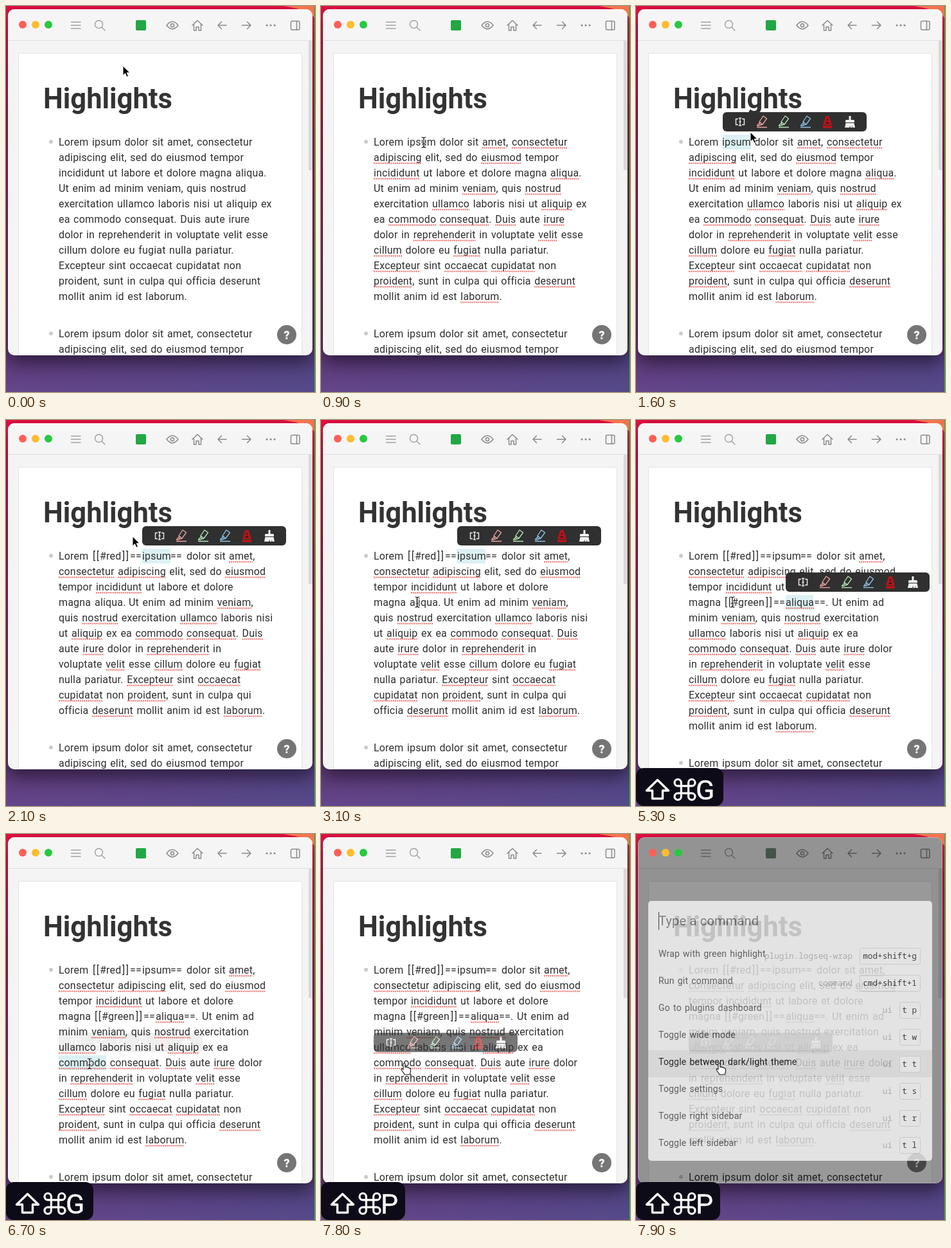
Recreate the animation shown at these times as an HTML page. Size 481x600 px, loop 8000 ms.

```html
<!DOCTYPE html>
<html lang="en">
<head>
<meta charset="utf-8">
<title>Highlights</title>
<style>
  html, body { margin: 0; width: 100%; height: 100%; overflow: hidden; background: #5b4088; }
  svg { display: block; }
  text { font-family: Roboto, "Noto Sans", sans-serif; }
  .body { font-size: 16px; letter-spacing: .18px; word-spacing: 1.4px; fill: #2e2e2e; }
  .bracket { letter-spacing: 1.5px; }
  .wave { stroke: #e8706b; stroke-width: 2; stroke-dasharray: 2 1; }
  .icon { fill: none; stroke: #8a8a8a; stroke-width: 1.5; stroke-linecap: round; stroke-linejoin: round; }
  .label { font-size: 14px; letter-spacing: .2px; word-spacing: 1.4px; fill: #4a4a4a; }
  .mono { font-family: "Noto Sans Mono", "DejaVu Sans Mono", monospace; font-size: 12.7px; }
</style>
</head>
<body>
<svg id="stage" width="481" height="600" viewBox="0 0 481 600">
  <defs>
    <linearGradient id="wall" x2="0" y2="1">
      <stop offset="0" stop-color="#e80f42"/><stop offset=".3" stop-color="#a5174e"/>
      <stop offset=".85" stop-color="#5f3272"/><stop offset="1" stop-color="#64468a"/>
    </linearGradient>
    <linearGradient id="cool">
      <stop offset="0" stop-color="#3f4f8c" stop-opacity="0"/><stop offset="1" stop-color="#3f4f8c" stop-opacity=".4"/>
    </linearGradient>
    <clipPath id="frame"><rect x="3" y="5" width="474" height="538" rx="10"/></clipPath>
  </defs>

  <rect width="481" height="600" fill="url(#wall)"/>
  <rect y="543" width="481" height="57" fill="url(#cool)"/>
  <rect x="3" y="5" width="474" height="538" rx="10" style="filter:drop-shadow(0 12px 14px rgba(0,0,0,.5))"/>
  <path d="M432 0H481V20Q474 6 432 0Z" fill="#f4744f"/>

  <g clip-path="url(#frame)">
    <g id="content">
      <rect x="3" y="5" width="474" height="538" fill="#f4f4f4"/>
      <rect x="3" y="5" width="474" height="48" fill="#f6f5f6"/>
      <path d="M3 53.5H477" stroke="#e0e0e0"/>
      <rect x="471" y="54" width="6" height="201" fill="#d9d9d9"/>
      <rect x="19.5" y="73.5" width="441" height="480" fill="#fff" stroke="#e4e4e4"/>

      <g class="icon">
        <path d="M101.5 25H116M101.5 30H116M101.5 35H116" stroke="#a2a2a2"/>
        <path d="M149 33L154 38M150.5 28.5a6 6 0 1 1-12 0a6 6 0 1 1 12 0" stroke="#a2a2a2"/>
        <path d="M250 30Q259 18.5 268 30Q259 41.5 250 30Z"/><circle cx="259" cy="30" r="2.6"/>
        <path d="M290 30L298 22.5L306 30M292.5 28.5V38H296V32.5H300V38H303.5V28.5"/>
        <path d="M343 30H330M335.5 24.5L330 30L335.5 35.5"/>
        <path d="M367.5 30H381M375.5 24.5L381 30L375.5 35.5"/>
        <path d="M406 30h.1M412 30h.1M418 30h.1" stroke-width="3"/>
        <rect x="443.5" y="23.5" width="13.5" height="13.5" rx="2"/><path d="M452.5 24V37"/>
      </g>
      <rect x="202" y="22" width="16" height="16" rx="2" fill="#22a743"/>

      <text x="58" y="158.5" font-size="43.5" font-weight="700" fill="#333">Highlights</text>
      <g id="marks" fill="#dcf1f4"></g>
      <g id="notes"></g>

      <g id="bar">
        <rect width="224" height="30" rx="6" fill="#303030"/>
        <path d="M24 10.500H20.500V19.500H24M30 10.500H33.500V19.500H30M25 9Q27 9 27 10.500V19.500Q27 21 25 21M29 9Q27 9 27 10.500M27 19.500Q27 21 29 21M25.500 15H28.500"
              fill="none" stroke="#eee" stroke-width="1.400"/>
        <g id="pens" fill="none" stroke-width="1.3" stroke-linejoin="round"></g>
        <g fill="#b51519">
          <path d="M160.5 6H165.5L170 20H156Z"/><rect x="156" y="21" width="14" height="4"/>
          <path d="M163 9L164.5 13H161.5ZM161 15.5H165L165.8 18H160.2Z" fill="#421717"/>
        </g>
        <path d="M196.5 6H199.5V12H203.5Q205 12 205 13.5V16H191V13.5Q191 12 192.5 12H196.5ZM191.5 17H204.5L206 24H202.5L201.5 20.5V24H198.5V20.5L197 24H190Z" fill="#f2f2f2"/>
      </g>

      <circle cx="437" cy="511" r="15" fill="#757575"/>
      <text x="437" y="517.5" font-size="18" font-weight="900" fill="#fff" text-anchor="middle">?</text>
    </g>

    <g id="lights">
      <circle cx="26" cy="29" r="6" fill="#fe5f57"/>
      <circle cx="46" cy="29" r="6" fill="#febc2e"/>
      <circle cx="66" cy="29" r="6" fill="#28c840"/>
    </g>

    <g id="palette" opacity=".73">
      <rect x="19" y="104" width="442" height="404" rx="5" fill="#fff"/>
      <rect x="19" y="336" width="442" height="42" fill="#efefef"/>
      <path d="M35.5 121V149" stroke="#222"/>
      <text x="35" y="142" font-size="20" fill="#777" letter-spacing=".2">Type a command</text>
    </g>
  </g>
  <rect x="3.5" y="5.5" width="473" height="537" rx="9.5" fill="none" stroke="#fff" stroke-opacity=".25"/>

  <g id="keys">
    <rect id="keyBox" x="0" y="541" height="59" rx="12" fill="#0e0b18"/>
    <g fill="none" stroke="#fff" stroke-width="3.4" stroke-linejoin="round">
      <path d="M33.5 559.5L50.500 576H41.500V588.500H25.500V576H16.500Z"/>
      <path transform="translate(76 574.5) scale(.94)" d="M-6-6V-11.5a5.5 5.5 0 1 0-5.5 5.5H11.5a5.5 5.5 0 1 0-5.5-5.5V11.5a5.5 5.5 0 1 0 5.5-5.5H-11.5a5.5 5.5 0 1 0 5.5 5.5Z"/>
    </g>
    <text id="keyChar" x="93" y="589.5" font-size="43" fill="#fff" stroke="#fff" stroke-width=".4"></text>
  </g>

  <g id="cursor">
    <path id="arrow" d="M0 0V15L3.5 11.7L6 17.2L8.5 16L6.2 10.8H11Z" fill="#000" stroke="#fff"/>
    <g id="beam" fill="none" stroke-linecap="round">
      <path d="M-3-8Q0-8 0-6V6Q0 8-3 8M3-8Q0-8 0-6M0 6Q0 8 3 8M-2 2H2" stroke="#fff" stroke-width="2.6"/>
      <path d="M-3-8Q0-8 0-6V6Q0 8-3 8M3-8Q0-8 0-6M0 6Q0 8 3 8M-2 2H2" stroke="#111" stroke-width="1.2"/>
    </g>
    <path id="hand" d="M-2 9V1Q-2-1-.5-1Q1-1 1 1V5.5Q3.5 4 4 6Q6.5 5 7 7Q9.5 6.5 9.5 9V12Q9.5 14 8 17H0Q-1 14.5-4 11Q-5.5 8.5-4 8Q-3 7.5-2 9Z"
          fill="#fff" stroke="#111" stroke-width="1.1" stroke-linejoin="round"/>
  </g>
  <rect x="480" width="1" height="600" fill="#12c01a"/>
</svg>
<script>
const LOOP = 8000, STEP = 100, LEFT = 82, PITCH = 24;
const $ = id => document.getElementById(id);

function add(parent, tag, attrs, content) {
  const el = document.createElementNS("http://www.w3.org/2000/svg", tag);
  for (const k in attrs) el.setAttribute(k, attrs[k]);
  if (content) el.textContent = content;
  parent.appendChild(el);
  return el;
}

const odd = new Set(("amet consectetur adipiscing eiusmod incididunt aliqua veniam nostrud ullamco aliquip " +
  "commodo consequat Duis irure reprehenderit velit cillum fugiat Excepteur occaecat cupidatat " +
  "proident deserunt laborum").split(" "));

// "@123" places what follows at x = 123.
const plain = `Lorem ipsum dolor sit amet, consectetur
adipiscing elit, sed do eiusmod tempor
incididunt ut labore et dolore magna aliqua.
Ut enim ad minim veniam, quis nostrud
exercitation ullamco laboris nisi ut aliquip ex
ea commodo consequat. Duis aute irure
dolor in reprehenderit in voluptate velit esse
cillum dolore eu fugiat nulla pariatur.
Excepteur sint occaecat cupidatat non
proident, sunt in culpa qui officia deserunt
mollit anim id est laborum.`;

const red = `Lorem @135[[@146#red@181]]@193==@212ipsum@256== @281dolor sit @347amet,
consectetur adipiscing elit, sed do eiusmod
tempor incididunt ut labore et dolore
magna @138aliqua. @191Ut enim ad minim veniam,
quis nostrud exercitation ullamco laboris nisi
ut aliquip ex ea commodo consequat. Duis
aute irure dolor in reprehenderit in
voluptate velit esse cillum dolore eu fugiat
nulla pariatur. Excepteur sint occaecat
cupidatat non proident, sunt in culpa qui
officia deserunt mollit anim id est laborum.`;

const green = [...red.split("\n").slice(0, 3),
  "magna @138[[@149#green@202]]@214==@233aliqua@277==. @305Ut enim ad",
  "minim veniam, quis nostrud exercitation",
  "ullamco laboris nisi ut aliquip ex ea",
  "commodo consequat. Duis aute irure dolor",
  "in reprehenderit in voluptate velit esse",
  ...plain.split("\n").slice(7)].join("\n");

function drawLine(group, waves, line, y, skip) {
  const parts = ("@" + LEFT + line).split("@").slice(1);
  for (const part of parts) {
    const [, x, words] = part.match(/^(\d+)(.*)$/);
    const style = /^[[\]]/.test(words) ? "body bracket" : "body";
    const el = add(group, "text", { class: style, x, y }, words.trim());
    if (!waves) continue;
    for (const m of words.matchAll(/[A-Za-z]+/g)) {
      if (!odd.has(m[0]) || m[0] === skip) continue;
      const from = el.getStartPositionOfChar(m.index).x;
      const to = el.getEndPositionOfChar(m.index + m[0].length - 1).x;
      add(waves, "path", { class: "wave", d: `M${from} ${y + 3.5}H${to}` });
    }
  }
}

function buildNote(source, skip) {
  const node = add($("notes"), "g", {});
  const waves = add(node, "g", {});
  const lines = source.split("\n");
  lines.forEach((line, i) => drawLine(node, waves, line, 217 + i * PITCH, skip));
  const next = 217 + lines.length * PITCH + 34;
  plain.split("\n").slice(0, 2).forEach((line, i) => drawLine(node, null, line, next + i * PITCH));
  for (const y of [211, next - 6]) add(node, "circle", { cx: 70, cy: y, r: 3, fill: "#cbcbcb" });
  return { node, waves };
}
const notes = [buildNote(plain), buildNote(red, "aliqua"), buildNote(green)];

// from, to, x, y, width
const marks = [
  [1000, 2000, 135, 200, 44], [2000, 3300, 211, 200, 45], [4100, 5300, 138, 272, 44],
  [5300, 6200, 233, 272, 43], [6600, 7700, 82, 344, 74]
].map(([from, to, x, y, width]) => ({ from, to, el: add($("marks"), "rect", { x, y, width, height: 23 }) }));

["#f0a3a3", "#b4e6b8", "#8fc6ea"].forEach((stroke, i) => {
  const pen = add($("pens"), "g", { stroke, transform: `translate(${61 + 34 * i} 15)` });
  add(pen, "path", { d: "M-4 0L2-9L7.500-5L1 4L-3 5ZM-4 0L1 4M-4.500 2.500L-7.500 6H-3.500" });
  add(pen, "path", { d: "M-8 8.500H8" });
});

const commands = [
  ["Wrap with green highlight", "plugin.logseq-wrap", "mod+shift+g"],
  ["Run git command", "command", "cmd+shift+1"],
  ["Go to plugins dashboard", "ui", "t p"],
  ["Toggle wide mode", "ui", "t w"],
  ["Toggle between dark/light theme", "ui", "t t"],
  ["Toggle settings", "ui", "t s"],
  ["Toggle right sidebar", "ui", "t r"],
  ["Toggle left sidebar", "ui", "t l"]
];
commands.forEach(([name, kind, keys], i) => {
  const y = 191 + i * 42, p = $("palette"), w = keys.length > 3 ? 94 : 32;
  const label = add(p, "text", { class: "label", x: 35, y }, name);
  if (i === 4) label.style.fill = "#000";
  add(p, "text", { class: "mono", x: 431 - w, y: y + 3, "text-anchor": "end", fill: "#b3b3b3" }, kind);
  add(p, "rect", { x: 442.5 - w, y: y - 13.5, width: w, height: 25, rx: 3, fill: "#fff", stroke: "#dcdcdc" });
  add(p, "text", { class: "mono", x: 437, y: y + 3, "text-anchor": "end", fill: "#222" }, keys);
});

// Linear interpolation through [time, value] points.
function track(points, t) {
  const i = points.findIndex(p => p[0] > t);
  if (i < 0) return points[points.length - 1][1];
  if (i === 0) return points[0][1];
  const [t0, a] = points[i - 1], [t1, b] = points[i];
  return a + (b - a) * (t - t0) / (t1 - t0);
}
const latest = (list, t) => list.filter(p => p[0] <= t).pop();

const barFade = [[950, 0], [1300, 1], [3200, 1], [3400, 0], [4000, 0], [4400, 1], [6000, 1], [6300, 0],
  [6670, 0], [7100, 1], [7700, 1], [7800, .65], [7900, .6]];
const barSpots = [[0, 135, 165], [2000, 212, 165], [3500, 138, 237], [5300, 233, 237], [6500, 82, 309]];
const cursorX = [[0, 182], [800, 160], [1500, 160], [1600, 178], [1800, 197], [2600, 197], [3000, 150], [6000, 150], [6500, 130]];
const cursorY = [[0, 93], [800, 212], [1500, 212], [1600, 196], [1800, 181], [2600, 181], [3000, 283], [6000, 283], [6500, 357]];
const cursorKinds = [[0, "arrow"], [700, "beam"], [1600, "arrow"], [2800, "beam"], [7800, "hand"]];
const keyFade = [[7200, 1], [7600, 0], [7699, 0], [7700, 1]];

const show = (el, on) => { el.style.display = on ? "" : "none"; };
const move = (el, x, y) => el.setAttribute("transform", `translate(${x} ${y})`);

function draw(t) {
  const page = t < 2000 ? 0 : t < 5300 ? 1 : 2;
  notes.forEach((n, i) => show(n.node, i === page));
  show(notes[0].waves, t >= 700);
  marks.forEach(m => show(m.el, t >= m.from && t < m.to));

  const [, x, y] = latest(barSpots, t);
  move($("bar"), x, y);
  $("bar").setAttribute("opacity", track(barFade, t));

  const kind = latest(cursorKinds, t)[1];
  for (const id of ["arrow", "beam", "hand"]) show($(id), id === kind);
  move($("cursor"), track(cursorX, t), track(cursorY, t));

  const last = t >= 7700;
  show($("keys"), t >= 5300);
  $("keys").setAttribute("opacity", track(keyFade, t));
  $("keyBox").setAttribute("width", last ? 131 : 136);
  $("keyChar").textContent = last ? "P" : "G";

  const open = t >= 7900;
  show($("palette"), open);
  $("content").style.filter = open ? "grayscale(.8) brightness(.6)" : "";
}

const start = performance.now();
function tick() {
  const t = (performance.now() - start) % LOOP;
  draw(Math.floor(t / STEP) * STEP);
  requestAnimationFrame(tick);
}
tick();
</script>
</body>
</html>
```
